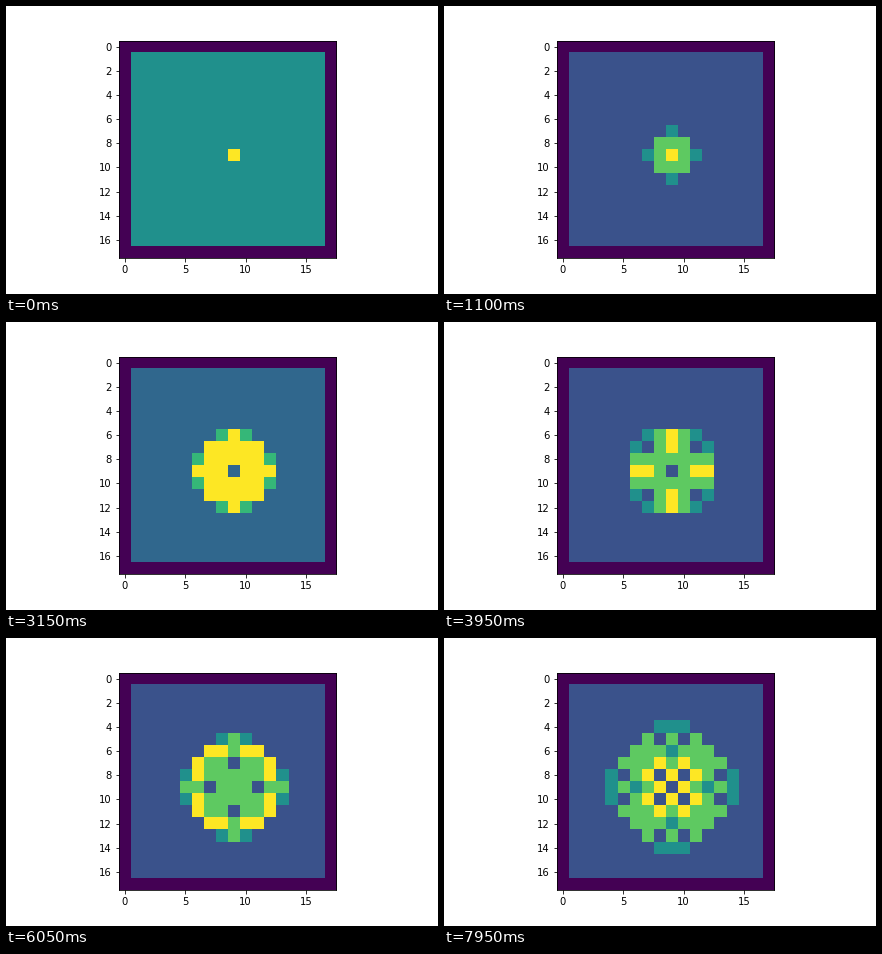
Animation of 432x288 px, one loop 8000 ms. Source, as a matplotlib script:

```python
import numpy as np
import matplotlib.pyplot as plt
from matplotlib.animation import FuncAnimation

SIZE = 18
CENTER = 9
FRAMES = 160
INTERVAL = 50
LIMIT = 4


def relax(pile):
    """Topple all overfull cells at once until none is left."""
    while True:
        full = pile >= LIMIT
        if not full.any():
            return
        # A toppled cell is emptied, whatever it held.
        pile[full] = 0
        pile[1:] += full[:-1]
        pile[:-1] += full[1:]
        pile[:, 1:] += full[:, :-1]
        pile[:, :-1] += full[:, 1:]


def grow(count):
    """Drop one grain on the center per step and keep each stable state."""
    pile = np.full((SIZE, SIZE), -1)
    pile[1:-1, 1:-1] = 0
    states = []
    for _ in range(count):
        pile[CENTER, CENTER] += 1
        relax(pile)
        states.append(pile.copy())
    return states


states = grow(FRAMES)

plt.rcParams["font.family"] = "DejaVu Sans"
plt.rcParams["font.size"] = 10
fig, ax = plt.subplots(figsize=(6, 4), dpi=72, facecolor="white")
fig.subplots_adjust(left=0.125, right=0.9, bottom=0.125, top=0.88)
image = ax.imshow(states[0], cmap="viridis", interpolation="nearest")
ax.set_xticks(range(0, SIZE, 5))
ax.set_yticks(range(0, SIZE, 2))


def update(i):
    image.set_data(states[i])
    image.set_clim(states[i].min(), states[i].max())
    return [image]


anim = FuncAnimation(fig, update, frames=FRAMES, interval=INTERVAL,
                     repeat=True, repeat_delay=0, blit=False)
plt.show()
```
